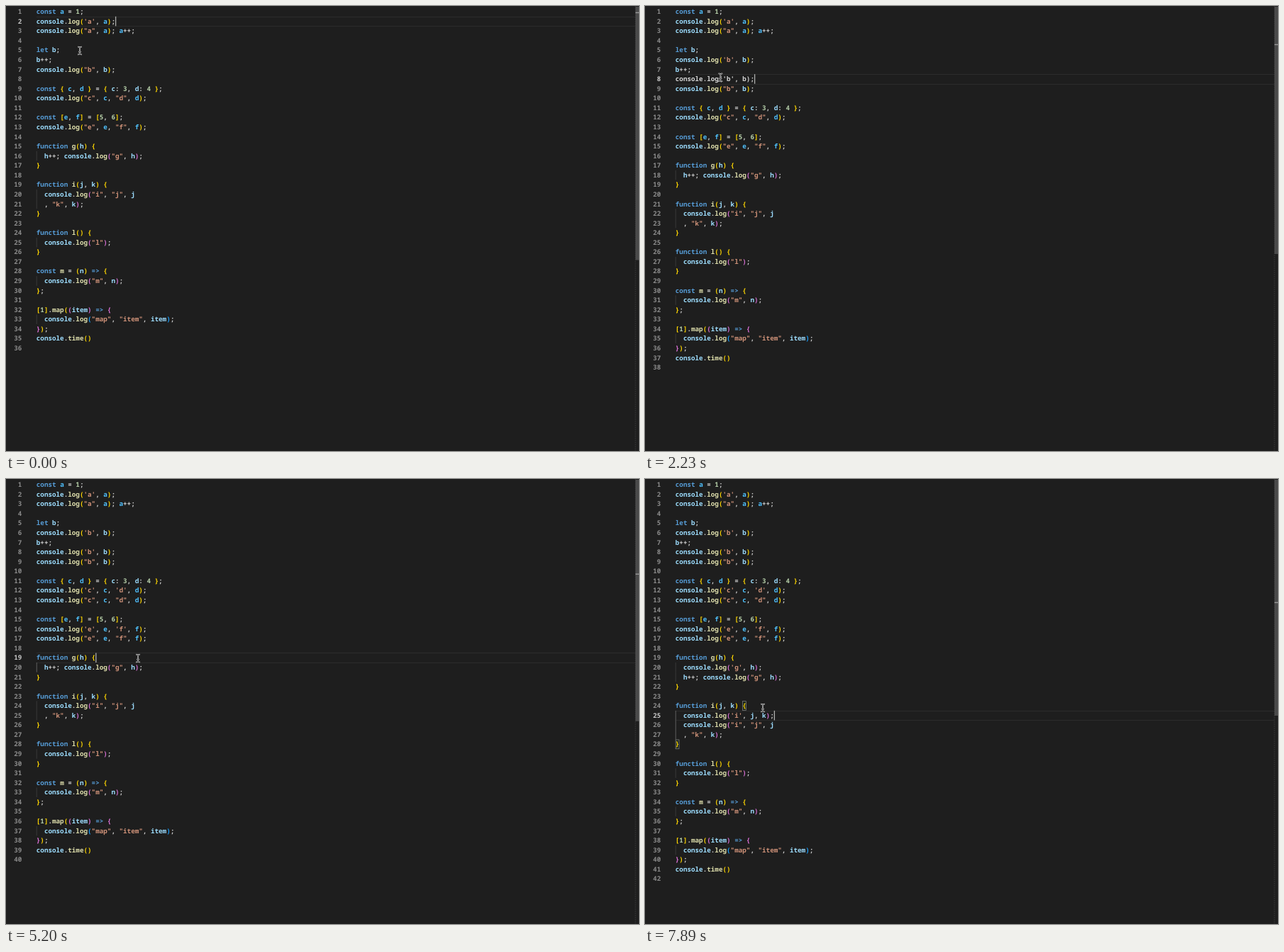
An HTML page that plays this animation: 892x628 px, repeating every 8000 ms.

```html
<!DOCTYPE html>
<html lang="en">
<head>
<meta charset="utf-8">
<title>Log snippets in an editor</title>
<style>
  html, body { margin: 0; width: 100%; height: 100%; overflow: hidden; background: #1e1e1e; }
  svg { display: block; }
  text {
    font: 600 9.26px "Noto Sans Mono", "DejaVu Sans Mono", monospace;
    text-rendering: geometricPrecision;
    font-variant-ligatures: none;
  }
  .num { text-anchor: end; }
</style>
</head>
<body>
<svg width="892" height="628" viewBox="0 0 892 628">
  <defs><path id="beam" d="M-2.2-5.4Q-.2-5.4 0-4Q.2-5.4 2.2-5.4M0-4V4M-2.2 5.4Q-.2 5.4 0 4Q.2 5.4 2.2 5.4M-1.2 1.6H1.2"/></defs>
  <g id="editor"></g>
  <g id="mouse" fill="none" stroke-linecap="round">
    <use href="#beam" stroke="#d8d8d8" stroke-width="1.7"/>
    <use href="#beam" stroke="#222" stroke-width=".6"/>
  </g>
</svg>
<script>
const LOOP = 8000, BEAT = 148.5, H = 628;
const LEFT = 42.8, TOP = 1.2, CHAR = 5.557, ROW = 13.57, RULER = 887;

const SOURCE = `const a = 1;
console.log('a', a);
console.log("a", a); a++;

let b;
b++;
console.log("b", b);

const { c, d } = { c: 3, d: 4 };
console.log("c", c, "d", d);

const [e, f] = [5, 6];
console.log("e", e, "f", f);

function g(h) {
  h++; console.log("g", h);
}

function i(j, k) {
  console.log("i", "j", j
  , "k", k);
}

function l() {
  console.log("l");
}

const m = (n) => {
  console.log("m", n);
};

[1].map((item) => {
  console.log("map", "item", item);
});
console.time()
`.split("\n");

// The pointer glides to a line, clicks its end, then a log line is added below.
// Times are in beats; first is how the new line looks during its first beat.
const VISITS = [
  { row: 5, x: 100, y: 72, from: 0, to: 5, click: 2, add: 7, text: "console.log('b', b);", first: "plain" },
  { row: 7, x: 80, y: 91, from: 7, to: 12, click: 11, add: 15, text: "console.log('b', b);", first: "plain" },
  { row: 11, x: 234, y: 148, from: 12, to: 20, click: 19, add: 23, text: "console.log('c', c, 'd', d);" },
  { row: 15, x: 211, y: 202, from: 23, to: 27, click: 26, add: 29, text: "console.log('e', e, 'f', f);", first: "plain" },
  { row: 19, x: 186, y: 253, from: 29, to: 33, click: 35, add: 38, text: "  console.log('g', h);", first: "blank" },
  { row: 24, x: 166, y: 323, from: 40, to: 46, click: 45, add: 53, text: "  console.log('i', j, k);" }
];
const BLINK = 50;

const BRACKETS = ["#ffd700", "#da70d6", "#179fff"];
const TOKEN = /(?<str>'[^']*'|"[^"]*")|(?<key>\b(?:const|let|function)\b|=>)|(?<num>\d+)|(?<name>[a-z]+)|(?<br>[()[\]{}])|(?<op>[^\s\w])/g;

const editor = document.getElementById("editor");
const mouse = document.getElementById("mouse");

const rowTop = row => TOP + (row - 1) * ROW;
const colX = col => LEFT + col * CHAR;
const rect = (x, y, w, h, fill, extra = "") =>
  `<rect x="${x}" y="${y}" width="${w}" height="${h}" fill="${fill}" ${extra}/>`;
const label = (x, row, fill, str, cls = "") =>
  `<text x="${x}" y="${rowTop(row) + 9.9}" fill="${fill}" class="${cls}">${str}</text>`;

function stateAt(beat) {
  const lines = SOURCE.map(text => ({ text }));
  let caret = { active: 2, row: 2, col: lines[1].text.length };
  let pair = null;
  for (const { row, click, add, text, first } of VISITS) {
    const target = lines[row - 1].text;
    if (beat >= click) caret = { active: row, row, col: target.length };
    if (beat > click && beat <= add && target.endsWith("{")) pair = { row, col: target.length - 1 };
    if (beat < add) continue;
    const look = beat === add && first;
    const blank = look === "blank";
    lines.splice(row, 0, { text: blank ? "  " : text, plain: look === "plain" });
    caret = blank ? { ...caret, active: row + 1 } : { active: row + 1, row: row + 1, col: text.length };
  }
  return { lines, caret, pair };
}

function pointerAt(beat) {
  let x = 104, y = 63;
  for (const v of VISITS) {
    const p = Math.min(1, Math.max(0, (beat - v.from) / (v.to - v.from))) ** 1.8;
    x += (v.x - x) * p;
    y += (v.y - y) * p;
  }
  return `translate(${x} ${y})`;
}

function nameColor(name, rest) {
  if (rest[0] === "(" || name === "m") return "#dcdcaa";
  return /^[acdef]$/.test(name) && rest[0] !== ":" ? "#4fc1ff" : "#9cdcfe";
}

function codeMarkup(lines) {
  let depth = 0, out = "";
  const color = (g, rest) => {
    if (g.str) return "#ce9178";
    if (g.key) return "#569cd6";
    if (g.num) return "#b5cea8";
    if (g.name) return nameColor(g.name, rest);
    if (g.br) return BRACKETS[("([{".includes(g.br) ? depth++ : --depth) % 3];
    return "#d4d4d4";
  };
  lines.forEach(({ text, plain }, i) => {
    for (const m of text.matchAll(TOKEN)) {
      const tint = color(m.groups, text.slice(m.index + m[0].length));
      out += label(colX(m.index), i + 1, plain ? "#d4d4d4" : tint, m[0]);
    }
  });
  return out;
}

// First and last row of the braces around the given row
function blockOf(lines, row) {
  const text = r => lines[r - 1].text;
  let a = row;
  if (!text(a).endsWith("{") && !text(a).startsWith("  ")) return [0, 0];
  while (!text(a).endsWith("{")) a--;
  let b = a + 1;
  while (text(b)[0] !== "}") b++;
  return [a, b];
}

function draw(beat) {
  const { lines, caret, pair } = stateAt(beat);
  const [open, close] = blockOf(lines, caret.active);
  const ratio = H / ((lines.length - 1) * ROW + H);
  const tickY = row => 1 + (row - 1) * ROW * ratio;

  let out = "", ticks = "";
  for (const row of [caret.active, caret.active + 1])
    out += rect(LEFT, Math.round(rowTop(row)), RULER - LEFT, 1, "#2c2c2c");

  lines.forEach(({ text }, i) => {
    const row = i + 1;
    out += label(22.4, row, row === caret.active ? "#c6c6c6" : "#8a8a8a", row, "num");
    if (text.startsWith("  "))
      out += rect(LEFT, rowTop(row), .8, ROW, row > open && row < close ? "#707070" : "#404040");
  });

  if (pair) {
    const end = blockOf(lines, pair.row)[1];
    for (const { row, col } of [pair, { row: end, col: 0 }]) {
      out += rect(colX(col) + .35, rowTop(row) + .35, CHAR - .7, ROW - .7, "#1c251c", 'stroke="#888" stroke-width=".7"');
      if (caret.row === pair.row) ticks += rect(890.5, tickY(row) + 1, 1.5, ROW * ratio, "#8a8a8a");
    }
  }

  out += codeMarkup(lines);
  const lit = beat < BLINK || beat >= VISITS.at(-1).add;
  if (lit) out += rect(colX(caret.col), rowTop(caret.row), 1.3, ROW, "#aeafad");

  out += `<path d="M${RULER} 0V${H}" stroke="#3a3a3a" stroke-width=".8" stroke-dasharray="2 1"/>`;
  out += rect(RULER, 1, 5, H * ratio, "#4a4a4a") + ticks;
  out += rect(RULER, tickY(caret.active), 5, 1.4, "#989898");
  editor.innerHTML = out;
  mouse.setAttribute("transform", pointerAt(beat));
}

let shown = -1;
const start = performance.now();
function tick() {
  const now = (performance.now() - start) % LOOP;
  const beat = Math.floor((now + 4) / BEAT);
  if (beat !== shown) draw(shown = beat);
  requestAnimationFrame(tick);
}
tick();
</script>
</body>
</html>
```
